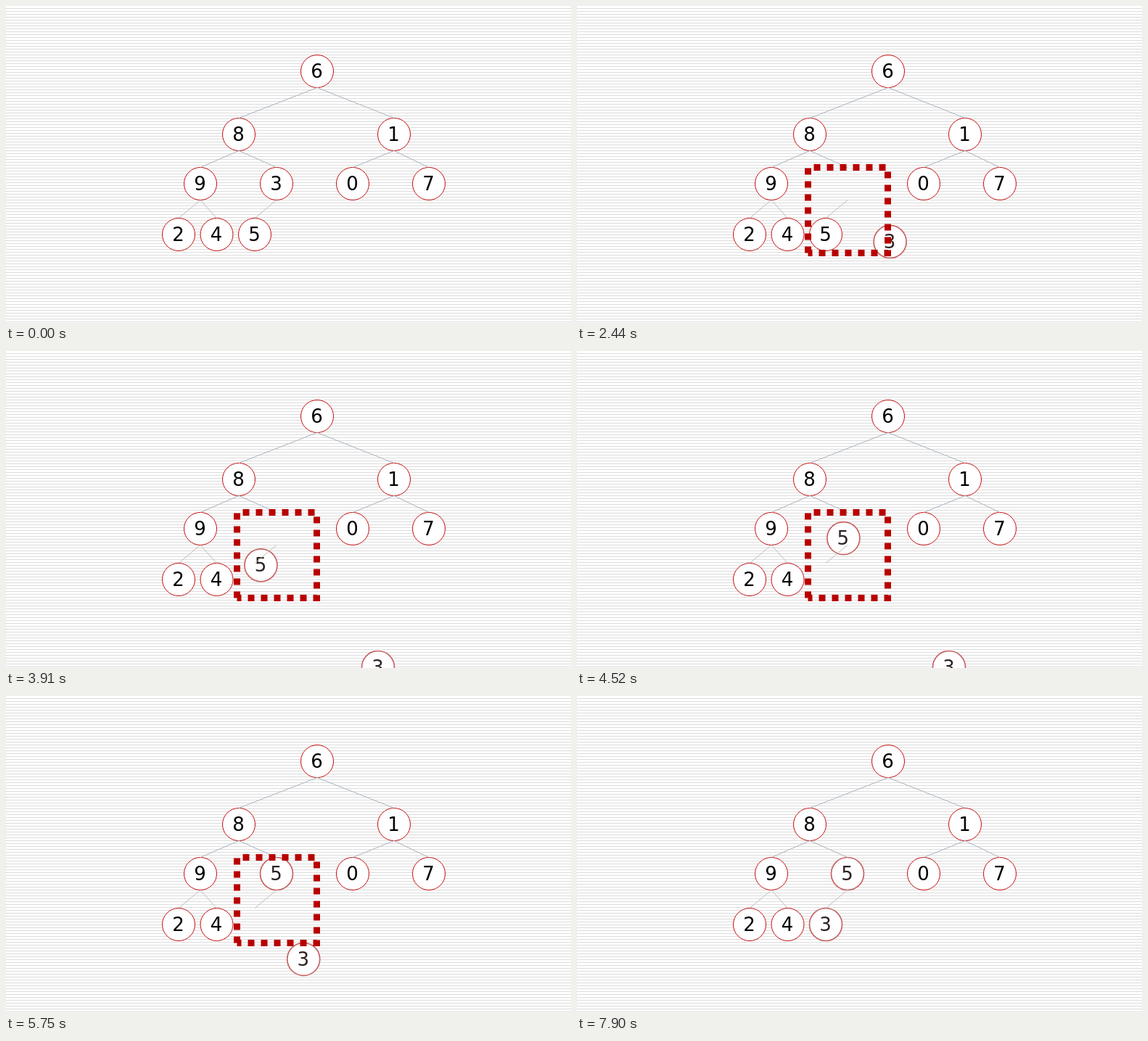
An HTML page for the animation above (8000 ms loop, 779 by 437 pixels).

```html
<!DOCTYPE html>
<html lang="en">
<head>
<meta charset="utf-8">
<title>Heap sift-down</title>
<style>
  html, body { margin: 0; width: 100%; height: 100%; overflow: hidden; background: #fff; }
  svg { display: block; width: 779px; height: 437px; }
  circle { fill: #fff; stroke: #c00000; stroke-width: .95; }
  text { font: 26px "DejaVu Sans", Verdana, sans-serif; text-anchor: middle; fill: #000; }
  .soft circle { stroke: #c76464; stroke-width: 1.7; }
  .soft text { fill: #2e2222; }
  .edge { stroke: #a9b3bf; stroke-width: 1; }
  .leaf { stroke: #bdbdbd; }
  #frame { fill: none; stroke: #b80000; stroke-width: 9; stroke-dasharray: 9; }
</style>
</head>
<body>
<svg viewBox="0 0 779 437">
  <defs>
    <pattern id="stripes" width="4" height="4" patternUnits="userSpaceOnUse">
      <rect y="3" width="4" height="1" fill="#dcdcdc"/>
    </pattern>
  </defs>
  <rect width="779" height="437" fill="url(#stripes)"/>
  <g id="nodes"></g>
  <g id="edges"></g>
  <path id="frame" d="M0 118V0H110V118H0"/>
</svg>
<script>
const LOOP = 8000, STEP = 76, R = 22.5;
const byId = id => document.getElementById(id);

// Heap in level order; each level has its first x, gap and y
const labels = [..."6819307245"];
const levels = [
  { x: 429, gap: 0, y: 90 },
  { x: 321, gap: 214, y: 177 },
  { x: 268, gap: 105, y: 245 },
  { x: 238, gap: 52.5, y: 315 }
];

function spot(i) {
  const depth = Math.floor(Math.log2(i + 1));
  const { x, gap, y } = levels[depth];
  return [x + gap * (i + 1 - 2 ** depth), y];
}

function add(parent, tag, attrs) {
  const el = document.createElementNS("http://www.w3.org/2000/svg", tag);
  for (const key in attrs) el.setAttribute(key, attrs[key]);
  return parent.appendChild(el);
}

function place(el, [x, y]) {
  el.setAttribute("transform", `translate(${x} ${y})`);
}

const nodes = {};
labels.forEach((label, i) => {
  const g = nodes[label] = add(byId("nodes"), "g");
  add(g, "circle", { r: R });
  add(g, "text", { x: -.5, y: 9 }).textContent = label;
  place(g, spot(i));
  if (!i) return;
  const [x1, y1] = spot((i - 1) >> 1), [x2, y2] = spot(i);
  add(byId("edges"), "line", {
    class: i > 6 ? "edge leaf" : "edge",
    x1, y1: y1 + R, x2, y2: y2 - R
  });
});

// The two swapped places and the waiting point below the stage
const upper = spot(4), lower = spot(9), aside = [513, 436];
const moves = [
  { label: 3, from: upper, to: aside, start: 1660, time: 1520, ramp: .28 },
  { label: 5, from: lower, to: upper, start: 3290, time: 1430, ramp: .4 },
  { label: 3, from: aside, to: lower, start: 4980, time: 1180, ramp: .2 }
];

// Speeds up during the ramp, then keeps an even speed
function ease(u, ramp) {
  const run = u < ramp ? u * u / (2 * ramp) : u - ramp / 2;
  return run / (1 - ramp / 2);
}

function draw(t) {
  place(nodes[3], upper);
  place(nodes[5], lower);
  nodes[3].classList.remove("soft");
  nodes[5].classList.remove("soft");

  for (const { label, from, to, start, time, ramp } of moves) {
    if (t < start) break;
    const elapsed = Math.floor((t - start) / STEP) * STEP;
    const p = ease(Math.min(1, elapsed / time), ramp);
    place(nodes[label], from.map((a, i) => a + (to[i] - a) * p));
    nodes[label].classList.add("soft");
  }

  const right = t >= 500 && t < 6200, left = t >= 7060 && t < 7900;
  byId("frame").style.visibility = right || left ? "visible" : "hidden";
  place(byId("frame"), right ? [318.5, 222.5] : [208, 221.5]);
}

const begin = performance.now();
function loop() {
  draw((performance.now() - begin) % LOOP);
  requestAnimationFrame(loop);
}
loop();
</script>
</body>
</html>
```
